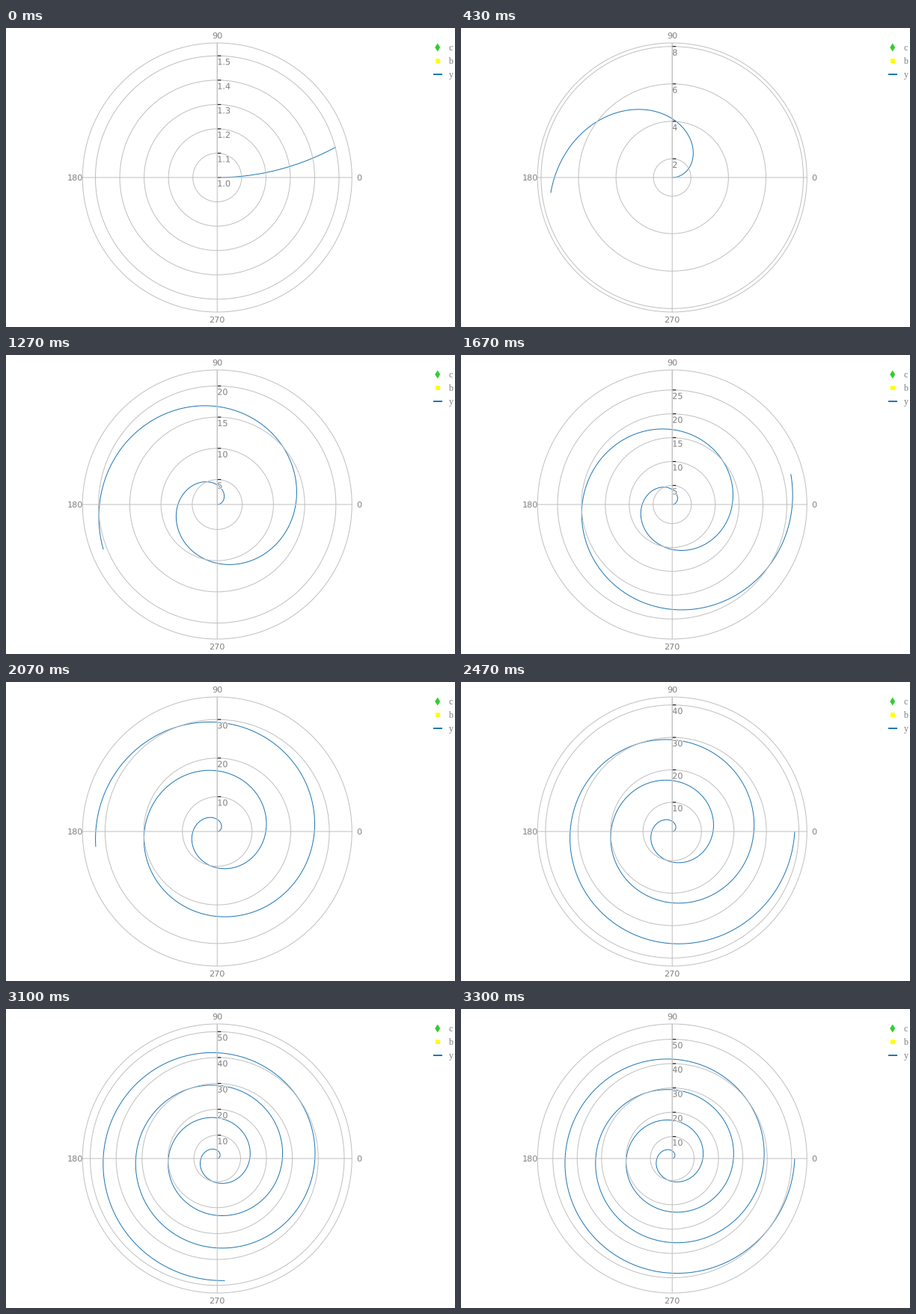
A matplotlib script that plays this animation: 600x400 px, repeating every 3.33 s.

```python
import math

import matplotlib.pyplot as plt
import numpy as np
from matplotlib import patheffects
from matplotlib.animation import FuncAnimation
from matplotlib.patches import Circle, Polygon, Rectangle

WIDTH, HEIGHT, DPI = 600, 400, 100
FRAMES, LOOP_MS = 100, 3330
PX = 72 / DPI                      # one pixel in points
CX, CY, RADIUS = 282.25, 200, 180
START, SLOPE, TURNS = 1, 2, 4      # r = START + SLOPE * theta
HEADROOM = 1.1
MAX_TICKS = 10
BLUE, SILVER, GRAY = "#1f77b4", "#c0c0c0", "#7f7f7f"

fig = plt.figure(figsize=(WIDTH / DPI, HEIGHT / DPI), dpi=DPI, facecolor="white")
ax = fig.add_axes([0, 0, 1, 1])
ax.set_xlim(0, WIDTH)
ax.set_ylim(HEIGHT, 0)
ax.axis("off")


def line(xs, ys, color, width=1, z=1):
    artist, = ax.plot(xs, ys, color=color, lw=width * PX, zorder=z, snap=False,
                      solid_capstyle="butt", solid_joinstyle="round")
    return artist


def ring(radius, z=2):
    return ax.add_patch(Circle((CX, CY), radius, fill=False, ec=SILVER,
                               lw=PX, zorder=z))


def label(x, y, text, ha="center", family="DejaVu Sans", size=11.2, z=4):
    return ax.text(x, y, text, ha=ha, va="baseline", family=family,
                   fontsize=size * PX, color=GRAY, zorder=z)


def nice_ticks(low, high, count=5):
    """Round tick values between low and high, and their decimals."""
    span = high - low
    step = 10 ** math.floor(math.log10(span / count))
    error = count / span * step
    for limit, factor in ((0.15, 10), (0.35, 5), (0.75, 2)):
        if error <= limit:
            step *= factor
            break
    first, last = math.ceil(low / step - 1e-9), math.floor(high / step)
    decimals = max(0, -math.floor(math.log10(step) + 0.01))
    return [i * step for i in range(first, last + 1)], decimals


def draw_frame_parts():
    ring(RADIUS)
    line([CX, CX], [CY, CY - RADIUS], SILVER, z=2)
    line([CX - RADIUS, CX + RADIUS], [CY, CY], SILVER, z=5)
    line([CX, CX], [CY - RADIUS, CY + RADIUS], SILVER, z=5)
    for angle in (0, 90, 180, 270):
        a = math.radians(angle)
        label(CX + 190 * math.cos(a), CY + 4 - 190 * math.sin(a), str(angle))


def draw_legend():
    ax.add_patch(Polygon([(576.7, 20.5), (580.2, 26), (576.7, 31.5), (573.2, 26)],
                         fc="#32cd32", lw=0))
    ax.add_patch(Rectangle((573.5, 41), 6.5, 6.3, fc="#ffff00", lw=0))
    line([571, 583], [62, 62], BLUE, 2)
    for i, name in enumerate("cby"):
        label(594.5, 30 + 18 * i, name, family="Liberation Serif", size=12)


draw_frame_parts()
draw_legend()
curve = line([], [], BLUE)
halo = [patheffects.withStroke(linewidth=2 * PX, foreground="white")]
rings = [ring(0) for _ in range(MAX_TICKS)]
marks = [line([], [], "black", z=3) for _ in range(MAX_TICKS)]
labels = [label(CX, CY, "", ha="left") for _ in range(MAX_TICKS)]
for text in labels:
    text.set_path_effects(halo)


def update(frame):
    end = 2 * math.pi * TURNS * (frame + 1) / FRAMES
    span = SLOPE * end * HEADROOM
    theta = np.linspace(0, end, 16 * (frame + 1))
    r = RADIUS * SLOPE * theta / span
    curve.set_data(CX + r * np.cos(theta), CY - r * np.sin(theta))

    ticks, decimals = nice_ticks(START, START + span)
    for i, (circle, mark, text) in enumerate(zip(rings, marks, labels)):
        shown = i < len(ticks)
        for artist in (circle, mark, text):
            artist.set_visible(shown)
        if shown:
            radius = RADIUS * (ticks[i] - START) / span
            y = CY - radius
            circle.set_radius(radius)
            mark.set_data([CX, CX + 5], [y, y])
            text.set_y(y + 12)
            text.set_text(f"{ticks[i]:.{decimals}f}")
    return [curve, *rings, *marks, *labels]


anim = FuncAnimation(fig, update, frames=FRAMES, interval=LOOP_MS / FRAMES,
                     repeat=True, repeat_delay=0, blit=False)
plt.show()
```
